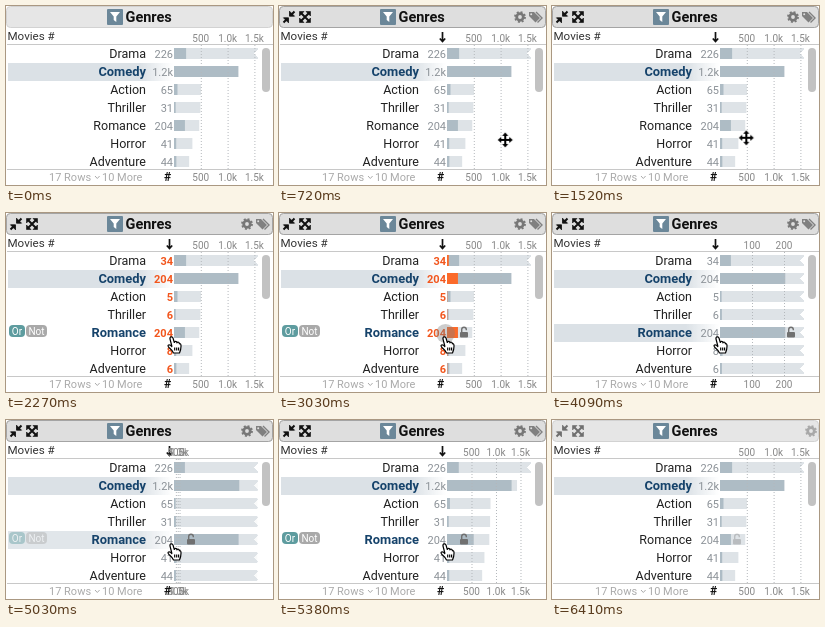
An HTML page for the animation above (6450 ms loop, 267 px wide and 179 px high).

```html
<!DOCTYPE html>
<html lang="en">
<head>
<meta charset="utf-8">
<title>Genres</title>
<style>
  html, body { margin: 0; width: 100%; height: 100%; overflow: hidden; background: #fff; }
  svg { display: block; width: 100%; height: 100%; font-family: Roboto, sans-serif; }
  .label { font-size: 12.5px; fill: #222; text-anchor: end; }
  .picked { font-size: 12.9px; font-weight: 700; fill: #16436b; }
  .count { font-size: 11px; fill: #8b9197; text-anchor: end; }
  .tick text { font-size: 10px; fill: #888; text-anchor: middle; }
  .tick line { stroke: #b4b8bc; stroke-dasharray: 1 2; }
  .foot { font-size: 11px; fill: #aaa; }
  .pill { font-size: 10px; fill: #fff; text-anchor: middle; }
  .rule { stroke: #c8c8c8; }
</style>
</head>
<body>
<svg id="stage" viewBox="0 0 267 179">
  <defs>
    <linearGradient id="fade">
      <stop offset=".8" stop-color="#dbe1e6"/>
      <stop offset="1" stop-color="#dbe1e6" stop-opacity="0"/>
    </linearGradient>
  </defs>

  <rect x=".5" y=".5" width="266" height="21" rx="4" fill="#e6e6e6" stroke="#d2d2d2"/>
  <rect id="headHover" x=".5" y=".5" width="266" height="21" rx="4" fill="#dedede" stroke="#a4a4a4"/>
  <rect x="101" y="3" width="16" height="16" rx="1" fill="#6b8799"/>
  <path d="M104 6h10l-3.700 4.500V16l-2.600-2v-3.500z" fill="#fff"/>
  <text x="119.500" y="16" font-size="14.500" font-weight="700" fill="#111">Genres</text>

  <g id="sizeIcons" fill="#111" stroke="#111" stroke-width="2">
    <path d="M4.500 16.500l3-3M12.500 8.500l3-3" fill="none"/>
    <path d="M4.500 11.800h5v5zM10.500 5.200v5h5z" stroke-width=".8"/>
    <path d="M22 7l8 8M30 7l-8 8" fill="none"/>
    <path d="M20.500 5.500h4.500l-4.500 4.500zM31.500 5.500h-4.500l4.500 4.500zM20.500 16.500h4.500l-4.500-4.500zM31.500 16.500h-4.500l4.500-4.500z" stroke-width=".6"/>
  </g>
  <g id="gear" fill="none" stroke="#777">
    <circle r="3.300" stroke-width="2.800"/>
    <circle r="5" stroke-width="1.800" stroke-dasharray="1.963"/>
  </g>
  <g id="tags" fill="#808080">
    <path d="M250 6h5l6 6-4.500 4.500-6.500-6.500z"/>
    <path d="M257 6l6 6-4.500 4.500" fill="none" stroke="#808080" stroke-width="1.400"/>
    <circle cx="252.200" cy="8.200" r="1" fill="#dedede"/>
  </g>

  <text x="1.500" y="34" font-size="11.600" fill="#333">Movies #</text>
  <path id="sortArrow" d="M163.500 26v9.500M160.800 32.500l2.700 3 2.700-3" fill="none" stroke="#111" stroke-width="1.700"/>
  <path class="rule" d="M1 38.500H267M1 163.500H267"/>

  <g id="rows"></g>
  <g id="ticks"></g>

  <rect x="256" y="42" width="8" height="44" rx="4" fill="#c2c2c2"/>
  <text class="foot" x="43" y="175">17 Rows</text>
  <path d="M89 170l2.300 2.500 2.300-2.500" fill="none" stroke="#aaa"/>
  <text class="foot" x="96" y="175">10 More</text>
  <text x="158" y="175" font-size="12" font-weight="700" fill="#111">#</text>

  <g id="pills">
    <rect x="3" y="112" width="16" height="12" rx="4" fill="#5e9c9f"/>
    <text class="pill" x="11" y="121.500">Or</text>
    <rect x="20" y="112" width="21" height="12" rx="4" fill="#a9a9a9"/>
    <text class="pill" x="30.500" y="121.500">Not</text>
  </g>
  <g id="lock">
    <rect x="-4" y="0" width="8" height="5.500" rx="1" fill="#707070"/>
    <path d="M-2.300 0v-2.500a2.300 2.300 0 0 1 4.600 0v.8" fill="none" stroke="#707070" stroke-width="1.400"/>
  </g>
  <circle id="click" cx="166.500" cy="120.500" r="9.500" fill="#808080" fill-opacity=".4"/>
  <g id="cursor">
    <path id="move" d="M0-7.500l3 3.500H1v3h3v-2L7.500 0 4 3V1H1v3h2L0 7.500-3 4h2V1h-3v2L-7.500 0-4-3v2h3v-3h-2z"
      fill="#000" stroke="#fff" stroke-width="1.200" paint-order="stroke"/>
    <path id="hand" transform="translate(-7.500 -8.500)" fill="#fff" stroke="#000" stroke-width="1.200" stroke-linejoin="round"
      d="M4.800 10L3 3Q2.700 1 4.200.8T6 2L7.300 6.500Q7.600 5.300 8.700 5.400T10 6.800Q10.500 5.800 11.500 6.300T12.300 7.800Q13.800 7.200 14 9.500Q14.200 13 12.500 17H6.500Q5.500 14.500 2 11.500Q.3 9.700 1.600 9T4.800 10.500ZM7.700 11.500v3M9.700 11.500v3M11.600 11.500v3"/>
  </g>
</svg>
<script>
const LOOP = 6450;
const ENTER = 420, HOVER = 2090, FILTER = 3390, UNFILTER = 4980, LEAVE = 6300;
const LEFT = 168, FULL = 84, SLIDE = 640;
const WIDE = 0.0536, NARROW = 0.32; // pixels per movie on each axis
const HOLD = 'steps(1)', OUT = 'cubic-bezier(.22,.61,.36,1)';
const byId = id => document.getElementById(id);

function add(parent, tag, attrs, text = '') {
  const el = document.createElementNS('http://www.w3.org/2000/svg', tag);
  for (const key in attrs) el.setAttribute(key, attrs[key]);
  el.textContent = text;
  return parent.appendChild(el);
}

// Each stop is [ms, value, easing towards the next stop].
function track(el, prop, ...stops) {
  stops.push([LOOP, stops.at(-1)[1]]);
  el.animate(
    stops.map(([ms, value, easing = HOLD]) => ({ offset: ms / LOOP, [prop]: value, easing })),
    { duration: LOOP, iterations: Infinity });
}
const show = (el, from, to) => track(el, 'opacity', [0, 0], [from, 1], [to, 0]);
const fadeFiltered = el => track(el, 'opacity', [0, 0], [FILTER, 0, 'linear'], [FILTER + 400, 1],
  [UNFILTER, 1, 'linear'], [UNFILTER + 300, 0]);
const px = n => `${n}px`;
const at = (x, y) => `translate(${x}px, ${y}px)`;
const barWidth = (n, scale) => px(Math.min(FULL, n * scale));

function bar(y, fill, before, after) {
  const el = add(byId('rows'), 'rect', { x: LEFT, y: y - 5.5, height: 11, fill });
  track(el, 'width', [0, before], [FILTER, before, 'ease-in-out'], [FILTER + SLIDE, after],
    [UNFILTER, after, 'ease-in-out'], [UNFILTER + SLIDE, before]);
}

function addRow([name, total, part, both], i) {
  const rows = byId('rows'), y = 47.5 + 18 * i;
  const comedy = name === 'Comedy', romance = name === 'Romance';

  if (comedy || romance) {
    const band = add(rows, 'rect', { x: 2, y: y - 8.5, width: 165, height: 18, fill: 'url(#fade)' });
    if (romance) fadeFiltered(band);
  }

  const label = add(rows, 'text', { class: comedy ? 'label picked' : 'label', x: 140, y: y + 4.5 }, name);
  if (romance) {
    track(label, 'opacity', [0, 1], [HOVER, 0], [LEAVE, 1]);
    show(add(rows, 'text', { class: 'label picked', x: 140, y: y + 4.5 }, name), HOVER, LEAVE);
  }

  const shown = part > 999 ? (part / 1000).toFixed(1) + 'k' : part;
  const count = add(rows, 'text', { class: 'count', x: 167, y: y + 4.5 }, shown);
  track(count, 'opacity', [0, 1], [HOVER, 0], [UNFILTER, 1]);
  const joint = add(rows, 'text', { class: 'count', x: 167, y: y + 4.5 }, both);
  show(joint, HOVER, UNFILTER);
  track(joint, 'fill', [0, '#f2561d'], [FILTER, '#8b9197']);
  track(joint, 'fontWeight', [0, 700], [FILTER, 400]);

  bar(y, '#dee3e7', barWidth(total, WIDE), barWidth(total, NARROW));
  bar(y, '#aebcc5', barWidth(part, WIDE), barWidth(both, NARROW));

  const preview = add(rows, 'rect', { x: LEFT, y: y - 5.5, height: 11, fill: '#fb6a2a' });
  const wide = barWidth(both, WIDE);
  track(preview, 'width', [0, '0px'], [HOVER + 180, '0px', 'ease-in-out'], [HOVER + SLIDE, wide],
    [FILTER, wide, 'ease'], [FILTER + 300, '0px']);

  const notch = add(rows, 'path', { d: `M252 ${y - 4.5}l-4.500 4.500 4.500 4.500`, fill: '#fff', stroke: '#dee3e7' });
  if (i) fadeFiltered(notch);
}

function addTick(name, offset, first) {
  const g = add(byId('ticks'), 'g', { class: 'tick' });
  add(g, 'text', { y: 36 }, name);
  add(g, 'text', { y: 175 }, name);
  add(g, 'line', { x1: 0.5, x2: 0.5, y1: 39, y2: 163 });
  const start = first ? UNFILTER : FILTER, end = at(LEFT + offset, 0);
  track(g, 'transform', [0, end], [start, at(LEFT, 0), 'ease'], [start + 620, end]);
  if (first) track(g, 'opacity', [0, 1], [FILTER, 0], [UNFILTER, 1]);
  else show(g, FILTER, UNFILTER);
}

// name, all movies, those in the current filter, those also in the hovered genre
[['Drama', 1603, 226, 34], ['Comedy', 1200, 1200, 204], ['Action', 503, 65, 5],
 ['Thriller', 492, 31, 6], ['Romance', 471, 204, 204], ['Horror', 343, 41, 8],
 ['Adventure', 283, 44, 6]].forEach(addRow);
['500', '1.0k', '1.5k'].forEach((name, i) => addTick(name, 500 * (i + 1) * WIDE, true));
['100', '200'].forEach((name, i) => addTick(name, 100 * (i + 1) * NARROW, false));

show(byId('headHover'), ENTER, LEAVE);
show(byId('sortArrow'), ENTER, LEAVE);
show(byId('tags'), ENTER, LEAVE);
for (const id of ['sizeIcons', 'gear'])
  track(byId(id), 'opacity', [0, 0], [ENTER, 0, 'linear'], [ENTER + 200, 1],
    [LEAVE, 1, 'linear'], [LOOP - 1, 0.4]);
track(byId('gear'), 'transform', [0, at(241, 11)], [LEAVE, at(259, 11)]);

track(byId('pills'), 'opacity', [0, 0], [HOVER, 0, 'linear'], [HOVER + 120, 1], [FILTER, 0],
  [UNFILTER, 0, 'linear'], [UNFILTER + 120, 1], [LEAVE, 0]);
track(byId('lock'), 'opacity', [0, 0], [HOVER + 180, 0, 'linear'], [HOVER + SLIDE, 1],
  [LEAVE, 1, 'linear'], [LOOP - 1, 0.1]);
track(byId('lock'), 'transform', [0, at(185, 119)], [FILTER, at(239, 119)], [UNFILTER, at(185, 119)]);
track(byId('click'), 'opacity', [0, 0], [3030, 1], [3150, 0], [4680, 1], [4800, 0]);

track(byId('cursor'), 'transform', [0, at(285, 145)], [ENTER, at(285, 145), OUT],
  [1060, at(216, 132)], [1410, at(216, 132), OUT], [2030, at(168.5, 131.5)],
  [6020, at(168.5, 131.5), 'ease-in'], [6360, at(285, 150)]);
show(byId('hand'), 1590, 6140);
track(byId('move'), 'opacity', [0, 1], [1590, 0], [6140, 1]);
</script>
</body>
</html>
```
